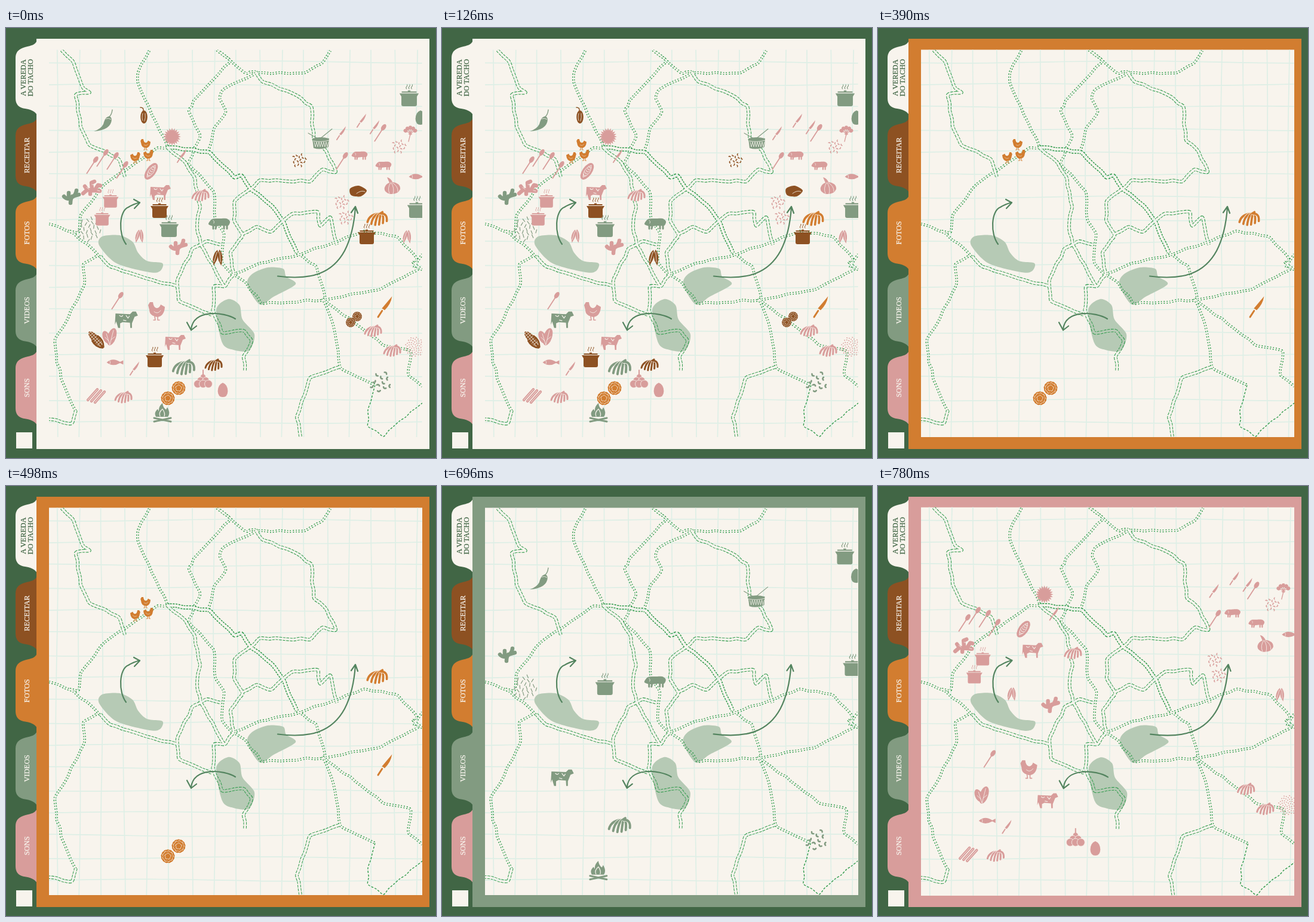
These frames come from a looping animation (720x720 px, 960 ms). An HTML page:

```html
<!DOCTYPE html>
<html lang="pt">
<head>
<meta charset="utf-8">
<title>Mapa ilustrado</title>
<style>
html, body { margin: 0; width: 100%; height: 100%; overflow: hidden; background: #416645; }
svg { display: block; width: 100vw; height: 100vh; }
text { font: 12.4px "Liberation Serif", serif; text-anchor: middle; stroke: currentColor; stroke-width: .25; fill: currentColor; }
</style>
</head>
<body>
<svg id="stage" viewBox="0 0 720 720"></svg>
<script>
const CREAM = '#f8f4ed', DARK = '#416645', ROAD = '#2f9a4b';
const COLORS = [CREAM, '#8d5122', '#d27d30', '#829b81', '#d89d9b'];
const ALL = 0, BROWN = 1, ORANGE = 2, SAGE = 3, PINK = 4;

// ---------- helpers ----------
function seeded(s) {
  return () => (s = (s * 16807) % 2147483647) / 2147483647;
}
const times = (n, f) => Array.from({ length: n }, (_, i) => f(i)).join('');
const fill = d => `<path d="${d}"/>`;
const line = (d, w = 2, c = 'currentColor') =>
  `<path d="${d}" fill="none" stroke="${c}" stroke-width="${w}" stroke-linecap="round" stroke-linejoin="round"/>`;
const cut = (d, w = 0.8) => line(d, w, CREAM);
const oval = (x, y, rx, ry = rx) => `<ellipse cx="${x}" cy="${y}" rx="${rx}" ry="${ry}"/>`;
const turned = (a, m, x = 0, y = 0) => `<g transform="translate(${x} ${y}) rotate(${a})">${m}</g>`;
const points = text => text.split(',').map(s => s.trim().split(' ').map(Number));

// smooth curve through the points
function curve(p, closed = false) {
  const n = p.length;
  const at = i => closed ? p[(i + n) % n] : p[Math.max(0, Math.min(n - 1, i))];
  const mix = (a, b, c, s) => [0, 1].map(j => (a[j] + s * (c[j] - b[j]) / 7).toFixed(1));
  let d = 'M' + p[0];
  for (let i = 0; i < (closed ? n : n - 1); i++) {
    const [a, b, c, e] = [-1, 0, 1, 2].map(k => at(i + k));
    d += `C${mix(b, a, c, 1)} ${mix(c, b, e, -1)} ${c}`;
  }
  return d;
}

// small seeded bends between key points
const rnd = seeded(2024);
function wander(p) {
  const out = [p[0]];
  for (let i = 1; i < p.length; i++) {
    const [x, y] = p[i - 1], dx = p[i][0] - x, dy = p[i][1] - y;
    const n = Math.ceil(Math.hypot(dx, dy) / 16);
    for (let k = 1; k < n; k++) {
      const side = () => (rnd() - 0.5) * 2.6;
      out.push([x + dx * k / n + side(), y + dy * k / n + side()]);
    }
    out.push(p[i]);
  }
  return out;
}

// ---------- icons, centred on 0,0 ----------
function scatter(n, r, len, w, seed, spin = 360, bend = 0.6) {
  const next = seeded(seed * 99991);
  return times(n, i => {
    const q = r * Math.sqrt((i + 0.5) / n), a = i * 2.4;
    return turned((next() - 0.5) * spin, line(`M0 ${-len / 2}Q${bend * len} 0 0 ${len / 2}`, w),
      q * Math.cos(a), q * Math.sin(a));
  });
}
const ear = (x, a) => turned(a, fill('M0 -13Q5 -6 3.5 4L1 14L-3 5Q-5 -6 0 -13Z') + cut('M0 -9V8'), x);
const icons = {
  pot: () => fill('M-11.5 -10H-2V-11.5H2V-10H11.5V-8H-11.5ZM-15 -7H15L12 -2V10Q12 13 9 13H-9Q-12 13 -12 10V-2Z') +
    times(3, i => line(`M${i * 4 - 4} -14q-1.6 -1.6 0 -3.2t1 -3.4`, 1)),
  bananas: () => times(6, i => {
    const d = `M5 -7Q${i * 5 - 11} -7 ${i * 5.4 - 14} ${5 + 4 * Math.sin(i * 0.7)}`;
    return cut(d, 4.3) + line(d, 3);
  }) + line('M4 -7L7 -9', 3),
  cow: () => fill('M-16 -9L6 -8L10 -12H15L18 -6L13 -4L9 6V13H6.5L6 5L-5 4L-9 6V13H-12L-15 3L-17 8Z') +
    cut('M-10 -6q3 3 5 0M0 -6l3 4l2 -3M-4 1l4 1', 1.1),
  pig: () => fill(curve(points('-18 1, -12 -7, 0 -8, 12 -8, 18 -3, 15 4, 5 4, -6 5, -13 4'), true)) +
    line('M-10 4V9M-5 4L-6 9M8 3V9M13 2V9', 3) + cut('M-10 -5q3 2 1 5'),
  chicken: () => fill('M-13 -10L-10 -15L-5 -15Q-4 -6 1 -5Q6 -5 8 -11L15 -7Q14 8 3 10Q-11 8 -11 -2Z') +
    line('M-2 9L-1 15H-4M3 9V15H6', 1.6) + cut('M-3 1Q3 6 8 -1'),
  spoon: () => turned(33, oval(0, -11.5, 3.6, 6) + line('M0 -6V16', 1.8)),
  knife: () => turned(33, fill('M.5 -14Q4 -6 2 3H-1.6Z') + line('M0 5V13', 1.9)),
  sun: () => oval(0, 0, 10.4) + times(20, i => turned(i * 18, fill('M-1.8 -10L0 -14.8L1.8 -10Z'))),
  marigold: () => times(13, i => turned(i * 27.7, oval(0, -8.5, 3.2, 3))) + oval(0, 0, 8.5) +
    [9, 5].map(r => times(r, i => turned(i * 360 / r + r, cut(`M-2 ${1 - r}Q0 ${-r - 2} 2 ${1 - r}`)))).join(''),
  cocoa: () => line('M-6 -14Q0 -14 -1 -8', 1.5) + oval(0, 2, 5.8, 11) + cut('M-2 -4Q-4 3 -2 8M2 -4Q3 3 1 9'),
  pod: () => turned(35, oval(0, 0, 8, 16) + cut('M0 -12Q9 0 0 12Q-9 0 0 -12') + times(5, i => cut(`M-2.5 ${i * 4 - 9}l2.5 2l2.5 -2`))),
  bread: () => fill(curve(points('-14 -4, 0 -9, 14 -1, 4 9, -12 7'), true)) + cut('M-3 4Q5 -2 11 1'),
  corn: () => ear(-3.5, 16) + ear(4.5, -4),
  cob: () => turned(-42, oval(0, -3, 6, 15) + times(7, i => cut(`M-6 ${i * 4 - 16}h12`)) + cut('M-2 -18V10M2 -18V10') +
    line('M-6 -3Q-9 8 -1 17M6 -3Q9 8 1 17M0 11V17', 3)),
  ginger: () => line('M-15 9L-8 3L13 5M-8 3L-12 -3M0 2L-1 -9L4 -11M5 3L10 -5L14 -4M-3 4V10', 6.5) + cut('M-9 -1l4 3M0 -6l4 1M9 4l4 1'),
  cactus: () => line('M-1 11Q-1 4 2 0M-2 4Q-9 4 -12 0M2 1Q8 -2 9 -10M6 -1L13 -3M-4 3V-6', 6.5),
  chili: () => line('M15 -20Q14 -11 9 -8', 1.4) + fill('M5 -7Q12 -12 14 -4Q13 14 -16 16Q-4 12 0 4Q2 -4 5 -7Z') + cut('M4 -5Q9 -7 13 -4'),
  drum: () => line('M-21 -14L-2 -3M19 -21L-2 -4', 1.1) + fill('M-14 -5Q0 -9 14 -5L13 9Q0 15 -12 11Z') +
    cut('M-13 -1Q0 2 14 -2') + times(6, i => cut(`M${i * 4 - 11} 1l2 8l2 -8`)),
  fire: () => fill('M-11 6Q-15 -1 -8 -7L-6 -3Q-7 -11 0 -17Q1 -9 6 -6L8 -10Q14 0 9 6Z') + cut('M-4 5Q-7 -1 0 -7Q5 0 3 5', 1.2) +
    line('M-14 8L14 14M14 8L-14 14', 3),
  leaf: () => turned(-22, oval(-2, 0, 6, 11), -4) + turned(18, oval(3, -1, 7, 15)) + cut('M0 14L-6 -5M0 13L6 -11M2 5L8 0M-2 7L-8 1'),
  fish: () => fill('M-15 0Q-4 -10 10 -1L16 -4V4L10 1Q-4 9 -15 0Z') + cut('M-9 -3Q-7 0 -9 3'),
  sticks: () => times(3, i => turned(42, cut('M0 -12V12', 6.5) + line('M0 -12V12', 4.4) + cut('M0 -12V12'), i * 6 - 6, i * 2 - 2)),
  fruits: () => times(6, i => {
    const row = i < 1 ? 0 : i < 3 ? 1 : 2, k = i - row * (row + 1) / 2;
    return `<g stroke="${CREAM}" stroke-width=".8">${oval((k - row / 2) * 9, row * 6 - 4, 4.5 + row)}</g>`;
  }) + line('M0 -8V-15', 2),
  egg: () => fill('M0 -12Q8 -9 8.4 2Q8 12 0 12Q-8 12 -8.4 2Q-8 -9 0 -12Z'),
  garlic: () => fill('M-9 -15Q-3 -14 0 -7Q14 -5 13 5Q9 14 -4 13Q-15 10 -13 2Q-11 -4 -5 -6Z') + cut('M-3 -6Q-9 3 -5 12M-2 -6Q4 3 1 13M0 -6Q10 0 9 9'),
  sprig: () => times(5, i => turned(i * 32 - 64, line('M0 3V-6', 1.2) + oval(0, -9, 3, 3.4))) + line('M0 2L-3 14', 1.3),
  seeds: () => scatter(15, 12, 2.8, 1.5, 41),
  grains: () => scatter(65, 17, 0.8, 1.3, 77),
  beans: () => scatter(11, 18, 4.6, 2.6, 19),
  rice: () => scatter(24, 20, 5.5, 1.2, 8, 80, 0)
};

const layers = COLORS.map(() => '');
function put(layer, kind, places, size = 1, flip = 1) {
  for (const [x, y] of points(places))
    layers[layer] += `<g transform="translate(${x} ${y}) scale(${size * flip} ${size})">${icons[kind]()}</g>`;
}
put(BROWN, 'cocoa', '231 147');
put(BROWN, 'seeds', '491 221');
put(BROWN, 'bread', '590 273');
put(BROWN, 'pot', '257 305, 604 349, 249 555');
put(BROWN, 'corn', '354 384');
put(BROWN, 'cob', '151 522');
put(BROWN, 'bananas', '348 564');
put(BROWN, 'marigold', '588 483, 577 493', 0.7);

put(ORANGE, 'chicken', '233 195', 0.6);
put(ORANGE, 'chicken', '217 217, 239 213', 0.6, -1);
put(ORANGE, 'bananas', '622 319', 1.2);
put(ORANGE, 'knife', '634 467', 1.55);
put(ORANGE, 'marigold', '289 603, 271 620');

put(SAGE, 'chili', '163 157');
put(SAGE, 'drum', '527 190');
put(SAGE, 'pot', '675 117, 273 336, 688 304', 1.08);
put(SAGE, 'egg', '694 150');
put(SAGE, 'cactus', '109 282');
put(SAGE, 'rice', '139 338');
put(SAGE, 'pig', '357 327');
put(SAGE, 'cow', '201 488', 1.1);
put(SAGE, 'bananas', '298 568', 1.3);
put(SAGE, 'fire', '262 645');
put(SAGE, 'beans', '628 594');

put(PINK, 'sun', '278 182');
put(PINK, 'spoon', '144 230, 161 218, 178 223, 194 238, 186 457, 626 176, 562 223');
put(PINK, 'knife', '294 214, 561 176, 595 155, 617 166, 215 570');
put(PINK, 'pod', '243 240');
put(PINK, 'cow', '258 275, 283 526');
put(PINK, 'bananas', '326 280, 197 618, 615 507, 647 540');
put(PINK, 'ginger', '144 268');
put(PINK, 'pot', '175 289, 161 319', 0.9);
put(PINK, 'corn', '223 348, 671 349', 0.85);
put(PINK, 'cactus', '288 366');
put(PINK, 'chicken', '251 474');
put(PINK, 'leaf', '174 517');
put(PINK, 'fish', '182 560, 688 249', 0.9);
put(PINK, 'sticks', '151 616');
put(PINK, 'fruits', '330 588');
put(PINK, 'egg', '363 606');
put(PINK, 'sprig', '677 176');
put(PINK, 'seeds', '658 198, 562 291, 569 317');
put(PINK, 'grains', '685 534');
put(PINK, 'pig', '592 213, 632 230', 0.74);
put(PINK, 'garlic', '647 265');

// ---------- roads: dashed bands with the middle masked out ----------
const KINDS = {
  twin: { width: 5.6, gap: 3.6, dash: '4.4 1.6' },
  band: { width: 7, gap: 4, dash: '3 1.6' },
  dots: { width: 4.4, gap: 1.6, dash: '2 2.8' },
  trail: { width: 1.4, gap: 0, dash: '3.6 2.4' }
};
let roads = '', gaps = '';
function road(kind, route) {
  const { width, gap, dash } = KINDS[kind], d = curve(wander(points(route)));
  roads += `<path d="${d}" stroke-width="${width}" stroke-dasharray="${dash}"/>`;
  if (gap) gaps += `<path d="${d}" stroke-width="${gap}"/>`;
}
// rivers of the north and centre
road('twin', '93 37, 112 56, 129 100, 140 108, 117 112, 125 165, 140 196, 189 220, 199 249');
road('twin', '418 73, 430 90, 485 112, 511 131, 516 188, 536 206, 552 241, 530 237, 509 257, 425 255, 383 290, 382 322, 396 347, 376 376, 381 412, 367 432, 348 433, 346 475');
road('twin', '270 200, 300 225, 316 251, 325 300, 320 330, 326 362, 365 432');
road('twin', '344 480, 290 457, 287 422, 312 370, 336 357, 360 363');
road('twin', '396 345, 420 333, 444 341, 480 311, 522 308, 526 331, 543 317, 554 363');
// rivers of the south
road('twin', '493 684, 487 652, 509 586, 560 567');
road('twin', '158 382, 174 399, 207 410, 261 427, 288 433');
road('twin', '346 470, 362 510, 398 507, 411 524, 398 550, 400 574');
road('twin', '117 640, 110 662, 72 655');
// main way
road('band', '270 200, 340 208, 383 250, 394 247, 410 270, 445 298, 465 325, 487 376');
// northern tracks
road('dots', '240 38, 221 75, 221 92, 270 198');
road('dots', '353 37, 376 55, 314 122, 306 138, 325 180, 306 226, 348 275, 351 322, 365 345, 362 392, 381 415');
road('dots', '358 40, 402 76, 418 73');
road('dots', '418 76, 364 103, 358 118, 368 140, 349 167, 340 202');
road('dots', '418 75, 500 75, 529 59, 543 38');
road('dots', '274 199, 253 201, 165 262, 125 314, 121 342, 107 340');
// eastern tracks
road('dots', '487 376, 519 399, 535 455');
road('dots', '381 412, 425 394, 490 380, 600 340, 655 350, 687 385, 683 402, 697 379');
road('dots', '697 405, 680 391, 690 404, 625 438, 535 455, 428 461, 402 427, 383 414');
road('dots', '530 453, 632 531, 677 541, 674 581, 697 600');
road('dots', '530 453, 548 498, 561 570, 618 598');
road('trail', '618 598, 606 640, 606 667, 632 684, 659 658, 697 628');
// western tracks
road('dots', '72 328, 113 344, 157 383');
road('dots', '155 380, 130 395, 131 430, 96 500, 82 522, 85 560, 98 600, 117 642');

// ---------- grid, blobs, arrows ----------
function grid() {
  let d = '';
  for (let k = 0; k < 17; k++)
    for (const upright of [true, false])
      for (let i = 0; i <= 22; i++) {
        const u = 36 + i * 30;
        const v = ((upright ? 85 : 57) + k * 37.7 + 1.8 * Math.sin(u / 90 + k * 2.1)).toFixed(1);
        d += (i ? 'L' : 'M') + (upright ? `${v} ${u}` : `${u} ${v}`);
      }
  return line(d, 1.7, '#deefe6');
}
const blobs = [
  '156 364, 161 349, 190 347, 212 358, 221 376, 236 390, 262 394, 258 407, 240 409, 185 394',
  '404 430, 412 412, 438 401, 464 403, 469 416, 485 429, 448 450, 425 463',
  '352 472, 372 454, 391 464, 396 488, 416 513, 407 540, 381 539, 362 527'
].map(b => `<path d="${curve(points(b), true)}" fill="#b6cab5"/>`).join('');
const arrows = [
  'M201 362C188 345 189 306 205 300Q213 295 224 292M214 287L224 292.5L215 302',
  'M455 415.5C512 423 547 410 567 373Q582 344 585 300M578 309L585 299L589 310',
  'M384 487C365 475 313 470 310 505M303 493L310 506L319 499'
].map(d => line(d, 2.2, '#53845f')).join('');

// ---------- side tabs ----------
const STEP = 129.8;
function tab(color, i) {
  const a = 21 + i * STEP, b = 145.5 + i * STEP;
  return `<path fill="${color}" d="M52 ${a}C48 ${a + 8} 43 ${a + 8} 32 ${a + 11}Q16 ${a + 15} 16 ${a + 29}` +
    `V${b - 28}Q16 ${b - 14} 29 ${b - 11}C42 ${b - 9} 47 ${b - 7} 52 ${b}Z"/>`;
}
const label = (words, x, i, color = CREAM) =>
  `<text transform="translate(${x} ${83.3 + i * STEP}) rotate(-90)" color="${color}">${words}</text>`;
const tabs = COLORS.map(tab).join('') +
  label('A VEREDA', 33, 0, DARK) + label('DO TACHO', 44.5, 0, DARK) +
  ['RECEITAR', 'FOTOS', 'VIDEOS', 'SONS'].map((t, i) => label(t, 38.5, i + 1)).join('');

const sheet = 'x="72" y="36.5" width="625" height="648.5"';
document.getElementById('stage').innerHTML = `
<defs>
  <clipPath id="view"><rect ${sheet}/></clipPath>
  <clipPath id="strip"><rect x="72" width="625" height="720"/></clipPath>
  <mask id="hollow" maskUnits="userSpaceOnUse" x="0" y="0" width="720" height="720">
    <rect width="720" height="720" fill="#fff"/><g fill="none" stroke="#000">${gaps}</g>
  </mask>
</defs>
<rect width="720" height="720" fill="${DARK}"/>
${tabs}
<rect x="17" y="677" width="27" height="27" fill="${CREAM}"/>
<rect id="panel" x="51" y="18" width="658" height="687"/>
<rect ${sheet} fill="${CREAM}"/>
<g clip-path="url(#strip)"><g id="map" clip-path="url(#view)">
  <rect ${sheet} fill="${CREAM}"/>
  ${grid()}${blobs}
  <g fill="none" stroke="${ROAD}" mask="url(#hollow)">${roads}</g>
  ${arrows}
  ${layers.map((m, i) => `<g class="layer" color="${COLORS[i]}" fill="${COLORS[i]}">${m}</g>`).join('')}
</g></g>`;

// ---------- playback ----------
const ENDS = [210, 390, 570, 780, 960];
const ZOOM = [1, 0.998, 1, 0.999, 1.003];
const panel = document.getElementById('panel'), map = document.getElementById('map');
const groups = [...document.querySelectorAll('.layer')];

function draw(ms) {
  const now = ENDS.findIndex(end => ms % 960 < end);
  panel.setAttribute('fill', COLORS[now]);
  map.setAttribute('transform', `translate(72 361) scale(${ZOOM[now]}) translate(-72 -361)`);
  groups.forEach((g, i) => g.setAttribute('display', now === ALL || now === i ? 'inline' : 'none'));
}
const start = performance.now();
function tick() {
  draw(performance.now() - start);
  requestAnimationFrame(tick);
}
draw(0);
requestAnimationFrame(tick);
</script>
</body>
</html>
```
